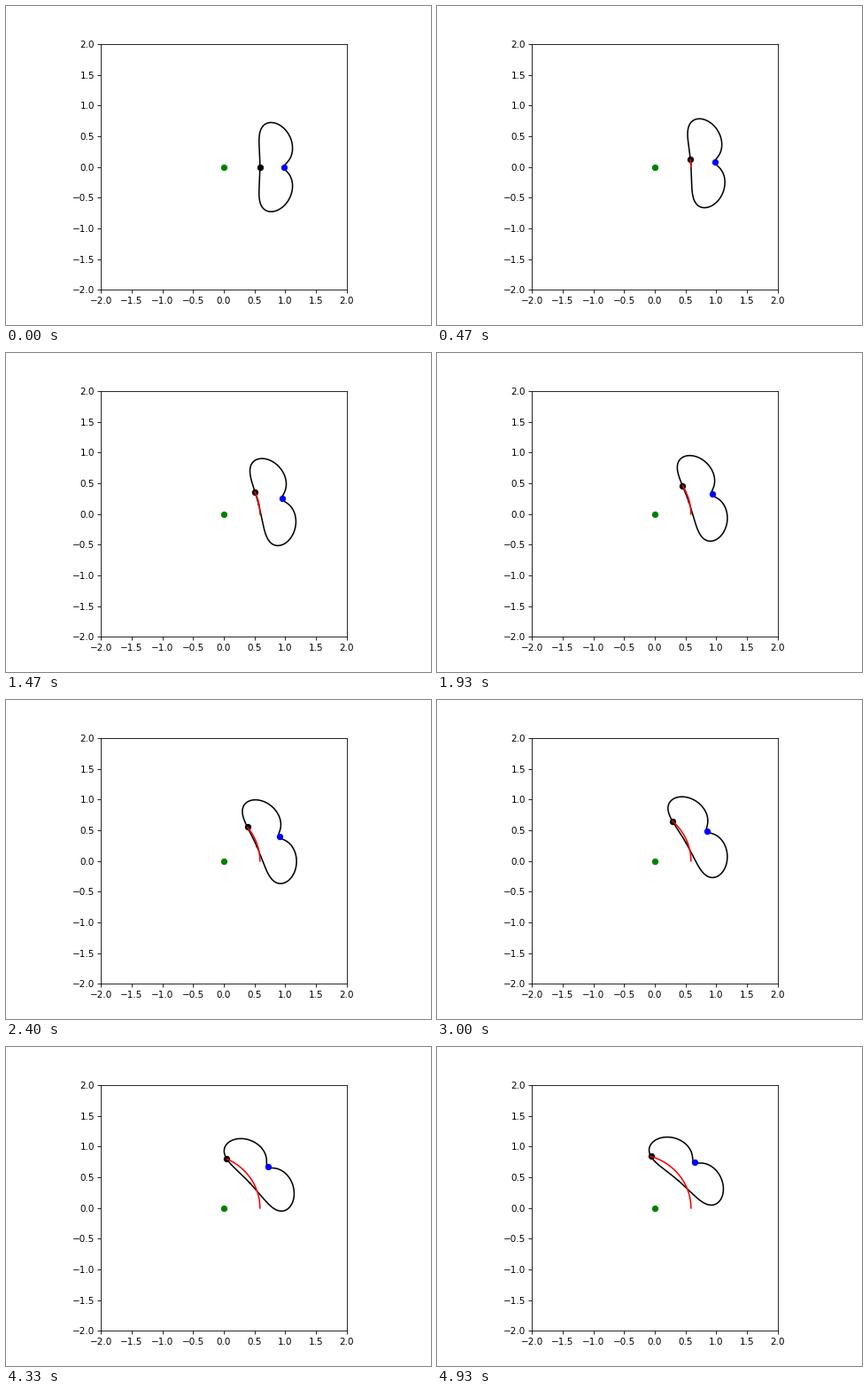
These frames come from a looping animation (480 by 360 pixels, 4.99 s). A matplotlib script:

```python
import numpy as np
import matplotlib.pyplot as plt
from matplotlib.animation import FuncAnimation

FRAMES = 75
LOOP_MS = 4990
DT = 0.01164          # moon angle per frame, radians
MU = 0.01215          # moon share of the total mass
MOON = 1 - MU
X0 = 0.589            # left crossing of the orbit


def accel(z, w):
    """Acceleration in the frame turning with the moon."""
    a, b = z + MU, z - MOON
    return z - 2j * w - MOON * a / abs(a) ** 3 - MU * b / abs(b) ** 3


def rk4(z, w, h):
    a1 = accel(z, w)
    w2 = w + h / 2 * a1
    a2 = accel(z + h / 2 * w, w2)
    w3 = w + h / 2 * a2
    a3 = accel(z + h / 2 * w2, w3)
    w4 = w + h * a3
    a4 = accel(z + h * w3, w4)
    return (z + h / 6 * (w + 2 * w2 + 2 * w3 + w4),
            w + h / 6 * (a1 + 2 * a2 + 2 * a3 + a4))


def half_orbit(vy):
    """Fly from the left crossing to the next crossing of the x axis."""
    t, z, w = 0.0, complex(X0), 1j * vy
    ts, zs = [t], [z]
    while z.imag >= 0 and t < 5.5:
        near = min(1.0, (abs(z - MOON) / 0.15) ** 1.5)
        h = 0.004 * max(near, 0.002)
        z, w = rk4(z, w, h)
        t += h
        ts.append(t)
        zs.append(z)
    return np.array(ts), np.array(zs), w


def too_fast(vy):
    _, zs, w = half_orbit(vy)
    z = zs[-1]
    if z.imag >= 0 or z.real < 0.9:
        return False
    return z.real > MOON or w.real > 0


def closed_orbit():
    """Bisect the start speed until the far crossing is perpendicular."""
    lo, hi = 0.82, 0.98
    for _ in range(40):
        mid = (lo + hi) / 2
        if too_fast(mid):
            hi = mid
        else:
            lo = mid
    ts, zs, _ = half_orbit(lo)
    return ts[:-1], zs[:-1]


ts, half = closed_orbit()
orbit = np.concatenate([half, half[::-1].conj()])
times = DT * np.arange(FRAMES)
spin = np.exp(1j * times)
craft = (np.interp(times, ts, half.real)
         + 1j * np.interp(times, ts, half.imag)) * spin

fig, ax = plt.subplots(figsize=(6.4, 4.8), dpi=75)
ax.set_aspect("equal")
ax.set(xlim=(-2, 2), ylim=(-2, 2))
ticks = np.arange(-2, 2.1, 0.5)
ax.set_xticks(ticks)
ax.set_yticks(ticks)

path, = ax.plot([], [], "k-")
ax.plot(0, 0, "go")
moon, = ax.plot([], [], "bo")
ship, = ax.plot([], [], "ko")
trail, = ax.plot([], [], "r-")


def place(line, z):
    z = np.atleast_1d(z)
    line.set_data(z.real, z.imag)


def update(i):
    place(path, orbit * spin[i])
    place(moon, MOON * spin[i])
    place(ship, craft[i])
    place(trail, craft[:i + 1])
    return path, moon, ship, trail


anim = FuncAnimation(fig, update, frames=FRAMES, interval=LOOP_MS / FRAMES,
                     repeat=True, repeat_delay=0)
plt.show()
```
